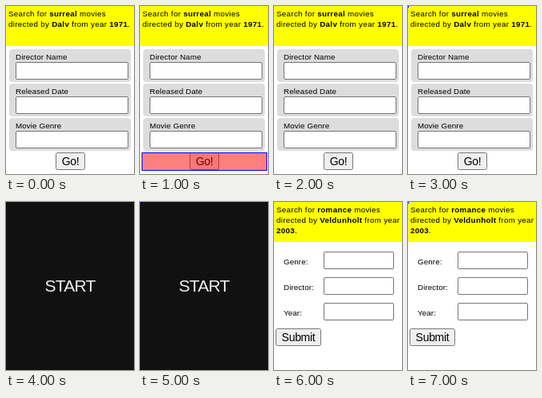
These frames come from a looping animation (160 by 210 pixels, 8 s). An HTML page:

```html
<!DOCTYPE html>
<html lang="en">
<head>
<meta charset="utf-8">
<title>Movie search</title>
<style>
  html, body { margin: 0; width: 100%; height: 100%; overflow: hidden; background: #fff; }
  #stage {
    position: relative; width: 160px; height: 210px; overflow: hidden;
    font: 9.8px/11px "Liberation Sans", Arial, sans-serif; color: #000; pointer-events: none;
  }
  #stage * { box-sizing: border-box; }
  .scene { position: absolute; inset: 0; background: #fff; }
  .query {
    height: 50px; padding: 3px; background: #ff0;
    line-height: 13px; letter-spacing: .3px; white-space: nowrap;
  }
  .row, label, input, button, #mark, #dot { position: absolute; }
  .row { left: 4px; width: 152px; height: 41px; border-radius: 4px; background: #ddd; }
  label { left: 12px; letter-spacing: .1px; white-space: nowrap; }
  input, button { height: 22px; margin: 0; }
  button {
    padding: 0; letter-spacing: -.3px;
    font: 14px "Liberation Sans", Arial, sans-serif;
  }
  #mark {
    left: 2px; top: 183px; width: 157px; height: 23px;
    border: 1px solid #00f; background: rgba(255, 0, 0, .5); background-clip: padding-box;
  }
  #dot { left: 0; top: 0; width: 1px; height: 2px; background: #00f; }
  #start {
    background: #111; color: #eee; text-align: center;
    font-size: 21px; line-height: 210px; letter-spacing: -.8px;
  }
</style>
</head>
<body>
<div id="stage">
  <div class="scene" id="first">
    <div class="query">Search for <b>surreal</b> movies<br>directed by <b>Dalv</b> from year <b>1971</b>.</div>
    <button tabindex="-1" style="left:62px;top:183px;width:37px">Go!</button>
  </div>
  <div class="scene" id="second">
    <div class="query">Search for <b>romance</b> movies<br>directed by <b>Veldunholt</b> from year<br><b>2003</b>.</div>
    <button tabindex="-1" style="left:2px;top:158px;width:57px">Submit</button>
  </div>
  <div class="scene" id="start">START</div>
  <div id="mark"></div>
  <div id="dot"></div>
</div>
<script>
  const LOOP = 8000;
  const $ = id => document.getElementById(id);

  function add(parent, tag, box, text = "") {
    const el = document.createElement(tag);
    for (const side in box) el.style[side] = box[side] + "px";
    el.textContent = text;
    if (tag === "input") el.tabIndex = -1;
    parent.append(el);
    return el;
  }

  ["Director Name", "Released Date", "Movie Genre"].forEach((name, i) => {
    const top = 54 + 43 * i;
    add($("first"), "div", { top }).className = "row";
    add($("first"), "label", { top: top + 4 }, name);
    add($("first"), "input", { left: 12, top: top + 16, width: 141 });
  });

  ["Genre:", "Director:", "Year:"].forEach((name, i) => {
    const top = 62 + 32 * i;
    add($("second"), "label", { top: top + 7 }, name);
    add($("second"), "input", { left: 62, top, width: 88 });
  });

  // Visible spans in ms for each part
  const spans = {
    first: [[0, 4000]],
    mark: [[1000, 2000]],
    start: [[4000, 6000]],
    second: [[6000, 8000]],
    dot: [[3000, 4000], [5000, 6000], [7000, 8000]]
  };

  for (const [id, list] of Object.entries(spans)) {
    const shown = t => list.some(([from, to]) => t >= from && t < to);
    const steps = [];
    for (let t = 0; t <= LOOP; t += 1000) {
      steps.push({
        offset: t / LOOP,
        visibility: shown(t % LOOP) ? "visible" : "hidden",
        easing: "step-end"
      });
    }
    $(id).animate(steps, { duration: LOOP, iterations: Infinity }).startTime = 0;
  }
</script>
</body>
</html>
```
